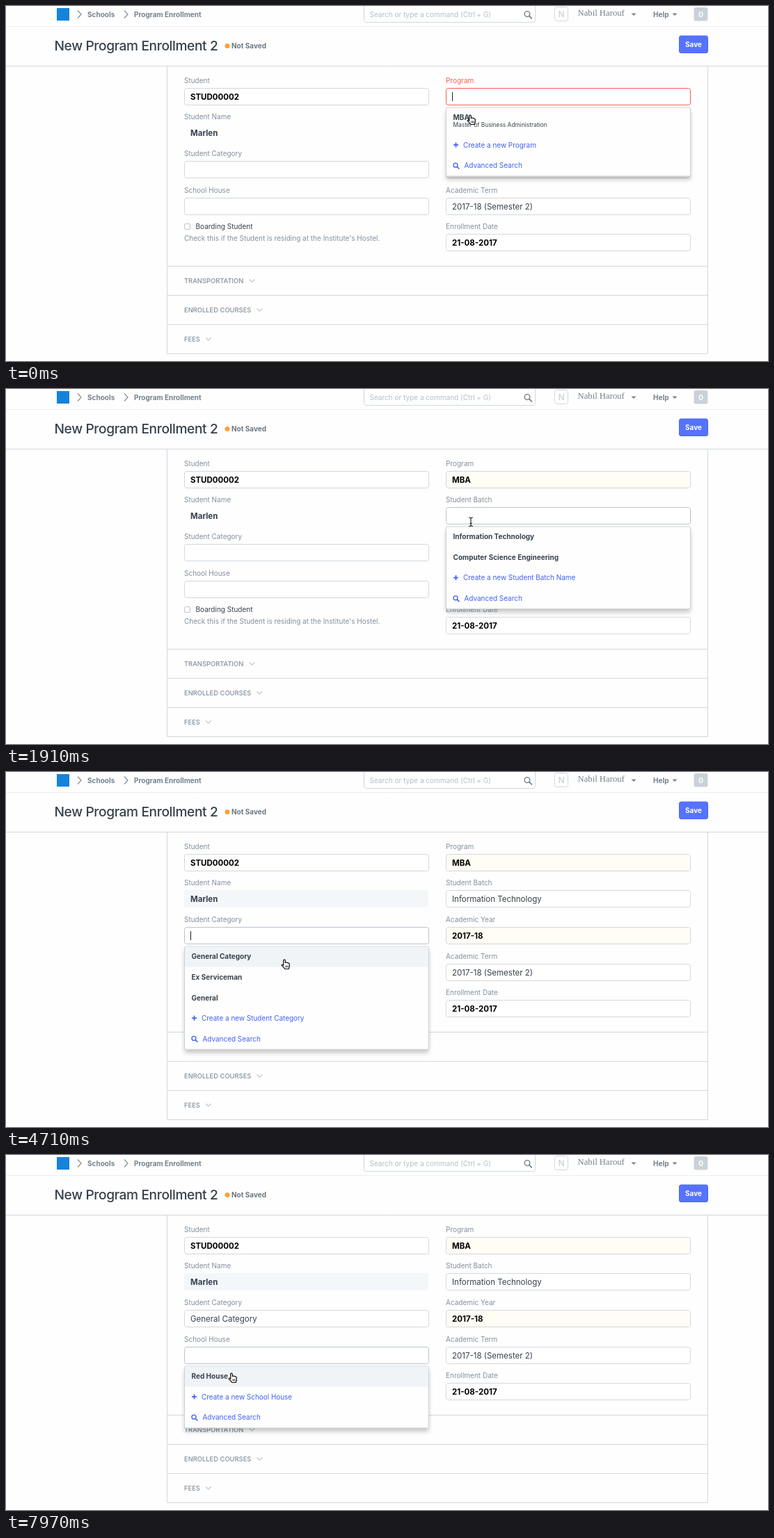
Write an HTML page with a canvas that moves like this. It is 1095 px wide and 511 px high and loops after 8000 ms.

```html
<!DOCTYPE html>
<html lang="en">
<head>
<meta charset="utf-8">
<title>Program Enrollment</title>
<style>
  html, body { margin: 0; width: 100%; height: 100%; overflow: hidden; background: #fefefe; }
  canvas { display: block; width: 1095px; height: 511px; }
</style>
</head>
<body>
<canvas id="stage"></canvas>
<script>
const W = 1095, H = 511, LOOP = 8000;
const STEP = 147.5, LEAD = 18;   // the screen refreshes once per step; all times below are in steps
const canvas = document.getElementById('stage');
const dpr = window.devicePixelRatio || 1;
canvas.width = W * dpr;
canvas.height = H * dpr;
const c = canvas.getContext('2d');

const LINE = '#d1d8dd', MUTED = '#838f9c', DARK = '#36414c', NAV = '#75818d', BLUE = '#4060f0', RED = '#fb5a4f';
const SANS = 'Inter, "Open Sans", sans-serif';
const SERIF = '"Liberation Serif", serif';
const LEFT = 256, RIGHT = 632, FIELD_W = 352, FIELD_H = 24, ITEM_H = 29.65;
const rowY = row => Math.floor(118.2 + 52.6 * row);

const LEFT_FIELDS = [
  { label: 'Student', value: 'STUD00002', bold: true },
  { label: 'Student Name', value: 'Marlen', bold: true, readOnly: true, shadeAt: 25 },
  { label: 'Student Category', value: 'General Category', focus: 26, open: 29, pick: 33, blur: 49,
    items: ['General Category', 'Ex Serviceman', 'General'], add: 'Student Category' },
  { label: 'School House', value: '', focus: 50, open: 52, pick: Infinity, blur: Infinity,
    items: ['Red House'], add: 'School House' }
];
const RIGHT_FIELDS = [
  { label: 'Program', value: 'MBA', bold: true, required: true, warm: true, focus: 0, open: 0, pick: 4, blur: 9,
    items: ['MBA'], note: 'Master of Business Administration', add: 'Program' },
  { label: 'Student Batch', value: 'Information Technology', focus: 10, open: 13, pick: 19, blur: 25,
    items: ['Information Technology', 'Computer Science Engineering'], add: 'Student Batch Name' },
  { label: 'Academic Year', value: '2017-18', bold: true, warm: true },
  { label: 'Academic Term', value: '2017-18 (Semester 2)' },
  { label: 'Enrollment Date', value: '21-08-2017', bold: true }
];
const place = x => (f, row) => ({ ...f, x, y: rowY(row) });
const FIELDS = [...LEFT_FIELDS.map(place(LEFT)), ...RIGHT_FIELDS.map(place(RIGHT))];

// Pointer glides: start, end, target x, target y
const HOME = [667, 157];
const GLIDES = [[4, 8, 668, 191], [16, 20, 673, 209], [20, 26, 400, 240], [29, 32, 400, 270],
                [36, 44, 334, 301], [44, 47, 333, 291], [51, 54, 324, 314]];

const within = (n, a, b) => n >= a && n < b;
const valueAt = (f, n) => n < f.pick ? '' : f.value;
const isOpen = (f, n) => within(n, f.open, f.pick);
const isFocused = (f, n) => within(n, f.focus, f.blur);
const menuTop = f => f.y + 28;

function ease(k) {
  k = Math.min(1, Math.max(0, k));
  return k * k * (3 - 2 * k);
}

function pointerAt(n) {
  return GLIDES.reduce(([x, y], [a, b, tx, ty]) => {
    const k = ease((n - a) / (b - a));
    return [x + (tx - x) * k, y + (ty - y) * k];
  }, HOME);
}

function text(s, x, y, size, color, weight = 400, family = SANS, align = 'left') {
  c.font = `${weight} ${size}px ${family}`;
  c.textAlign = align;
  c.fillStyle = color;
  c.fillText(s, x, y);
}

function line(points, color, width = 1) {
  c.beginPath();
  points.forEach(([x, y]) => c.lineTo(x, y));
  c.strokeStyle = color;
  c.lineWidth = width;
  c.stroke();
}

function box(x, y, w, h, r, fill, stroke) {
  c.beginPath();
  c.roundRect(x, y, w, h, r);
  if (fill) { c.fillStyle = fill; c.fill(); }
  if (stroke) { c.strokeStyle = stroke; c.lineWidth = 1; c.stroke(); }
}

function lens(x, y, r, color, width) {
  c.beginPath();
  c.arc(x, y, r, 0, 7);
  c.strokeStyle = color;
  c.lineWidth = width;
  c.stroke();
  line([[x + r * .7, y + r * .7], [x + r * 1.8, y + r * 1.8]], color, width * 1.2);
}

function crumb(x, label) {
  line([[x - 14, 6.5], [x - 9, 12], [x - 14, 17.5]], MUTED, 1.2);
  text(label, x, 16, 10, NAV, 700);
}

function triangle(x) {
  c.beginPath();
  c.moveTo(x, 10.5);
  c.lineTo(x + 7, 10.5);
  c.lineTo(x + 3.5, 14);
  c.fillStyle = NAV;
  c.fill();
}

function header() {
  box(73, 3, 18, 18, 0, '#1583dc');
  crumb(117, 'Schools');
  crumb(184, 'Program Enrollment');

  box(514.5, -6.5, 246, 30, 3, '#fff', LINE);
  text('Search or type a command (Ctrl + G)', 522.5, 16, 10, '#b5bec7');
  lens(749, 11.5, 3.8, '#6c7680', 1.3);
  box(788.5, 1.5, 19, 20, 3, '#fff', LINE);
  text('N', 798, 16, 12, '#c0c8cf', 400, SANS, 'center');
  text('Nabil Harouf', 821.5, 14, 12.7, '#75818d', 400, SERIF);
  triangle(898.5);
  text('Help', 930, 15.5, 10, NAV, 700);
  triangle(957.5);
  box(988.5, 2, 20, 19.5, 3, '#cbd1d8');
  text('0', 998.5, 16, 10.5, '#fff', 700, SANS, 'center');
  line([[0, 29.5], [W, 29.5]], '#ebeff2');

  c.letterSpacing = '-0.4px';
  text('New Program Enrollment 2', 69.5, 64, 19.2, DARK, 500);
  c.letterSpacing = '0px';
  c.beginPath();
  c.arc(318, 57.5, 3.5, 0, 7);
  c.fillStyle = '#ffa13c';
  c.fill();
  text('Not Saved', 324, 61, 10, '#6c7680', 700);
  box(967.5, 43, 41, 24.5, 2.5, '#5573ff', '#4b66f5');
  text('Save', 988, 58.6, 10, '#fff', 700, SANS, 'center');
  line([[0, 86.5], [W, 86.5]], LINE);
}

function field(f, n) {
  const { x, y } = f, value = valueAt(f, n), error = f.required && !value;
  text(f.label, x, y - 7.5, 10, error ? RED : MUTED);
  if (!f.readOnly) {
    const border = error ? RED : isFocused(f, n) ? '#bac3cb' : LINE;
    box(x + .5, y + .5, FIELD_W - 1, FIELD_H, 3, f.warm && value ? '#fffdf4' : '#fff', border);
  } else if (n >= f.shadeAt) {
    box(x, y, FIELD_W - 1, FIELD_H + 1, 2, '#f4f7fa');
  }
  text(value, x + 9, y + 17, 11.5, f.bold && !f.readOnly ? '#000' : DARK, f.bold ? 700 : 400);
  if (isFocused(f, n)) caret(f, n, x + 9 + c.measureText(value).width);
}

// Blinks every three steps, counted from the last input
function caret(f, n, x) {
  const since = n - (n < f.pick ? f.focus : f.pick);
  if (Math.floor(since / 3) % 2) return;
  const px = Math.round(x) + .5;
  line([[px, f.y + 6], [px, f.y + 19]], '#222');
}

function section(title, i) {
  const y = 395.5 + 42 * i;
  line([[231, y - 21], [1009, y - 21]], LINE);
  text(title, LEFT, y + 3.5, 9.4, MUTED, 500);
  const x = LEFT + c.measureText(title).width + 12;
  line([[x - 3.8, y - 2], [x, y + 1.8], [x + 3.8, y - 2]], '#b8c2cc', 1.1);
}

function form(n) {
  line([[231.5, 87], [231.5, 500.5], [1008.5, 500.5], [1008.5, 87]], LINE);
  FIELDS.forEach(f => field(f, n));
  box(256.5, 313.5, 8, 8, 1.5, '#fff', '#bcc4cb');
  text('Boarding Student', 272.5, 321, 10, DARK);
  text("Check this if the Student is residing at the Institute's Hostel.", LEFT, 337.5, 10, MUTED);
  ['TRANSPORTATION', 'ENROLLED COURSES', 'FEES'].forEach(section);
}

function menu(f, n, pointerY) {
  const { x } = f, top = menuTop(f), first = ITEM_H + (f.note ? 10 : 0);
  const h = first + ITEM_H * (f.items.length + 1);
  c.save();
  c.shadowColor = 'rgba(0,0,0,.22)';
  c.shadowBlur = 6 * dpr;
  c.shadowOffsetY = 5 * dpr;
  box(x + .5, top, FIELD_W - 1, h, 2, '#fefefe');
  c.restore();
  box(x + .5, top, FIELD_W - 1, h, 2, '#fefefe', '#c9d0d6');
  if (n > f.open && pointerY > top) box(x + 1, top + .5, FIELD_W - 2, first - .5, 0, '#f0f4f7');

  f.items.forEach((s, i) => text(s, x + 10.5, top + 18.4 + i * ITEM_H, 10, DARK, 700));
  if (f.note) text(f.note, x + 10.5, top + 28, 8.4, DARK);

  const y = top + first + ITEM_H * (f.items.length - .5) - .5;
  line([[x + 11, y], [x + 18, y]], BLUE, 1.7);
  line([[x + 14.5, y - 3.5], [x + 14.5, y + 3.5]], BLUE, 1.7);
  text('Create a new ' + f.add, x + 25, y + 3.6, 9.95, BLUE);
  lens(x + 14, y + ITEM_H - .5, 3, BLUE, 1.3);
  text('Advanced Search', x + 26.5, y + ITEM_H + 3.6, 9.95, BLUE);
}

const pointers = {
  arrow() {
    const p = new Path2D('M0 0V11.5L2.7 9L4.6 13L6.5 12.2L4.7 8.2H8.2Z');
    c.strokeStyle = '#fff';
    c.lineWidth = 2;
    c.stroke(p);
    c.fillStyle = '#000';
    c.fill(p);
  },
  hand() {
    const p = new Path2D('M-1.3 8V1Q0 -.8 1.3 1V4.5Q4 3.5 7.3 6V10L6.3 13.5H.8L-4 8Q-3 6 -1.3 8Z');
    c.fillStyle = '#fff';
    c.fill(p);
    c.strokeStyle = '#111';
    c.lineWidth = 1.2;
    c.stroke(p);
    for (let i = 0; i < 3; i++) line([[1.8 + i * 1.7, 8.5], [1.8 + i * 1.7, 11.5]], '#111', .8);
  },
  beam() {
    const p = new Path2D('M-3 -6Q0 -6 0 -4.5Q0 -6 3 -6M0 -4.5V5M-1.5 2.5H1.5M-3 6.5Q0 6.5 0 5Q0 6.5 3 6.5');
    for (const [color, width] of [['#fff', 2.4], ['#111', 1.1]]) {
      c.strokeStyle = color;
      c.lineWidth = width;
      c.stroke(p);
    }
  }
};

function pointer(x, y, open) {
  const overField = FIELDS.some(f => !f.readOnly && within(x, f.x, f.x + FIELD_W) && within(y, f.y, f.y + FIELD_H));
  const kind = open && y > menuTop(open) ? 'hand' : overField ? 'beam' : 'arrow';
  c.save();
  c.translate(x, y);
  pointers[kind]();
  c.restore();
}

function draw(time) {
  const n = Math.floor((time + LEAD) / STEP);
  const [x, y] = pointerAt(n);
  const open = FIELDS.find(f => isOpen(f, n));
  c.setTransform(dpr, 0, 0, dpr, 0, 0);
  c.fillStyle = '#fefefe';
  c.fillRect(0, 0, W, H);
  header();
  form(n);
  if (open) menu(open, n, y);
  pointer(x, y, open);
}

const start = performance.now();
function frame() {
  draw((performance.now() - start) % LOOP);
  requestAnimationFrame(frame);
}
frame();
</script>
</body>
</html>
```
